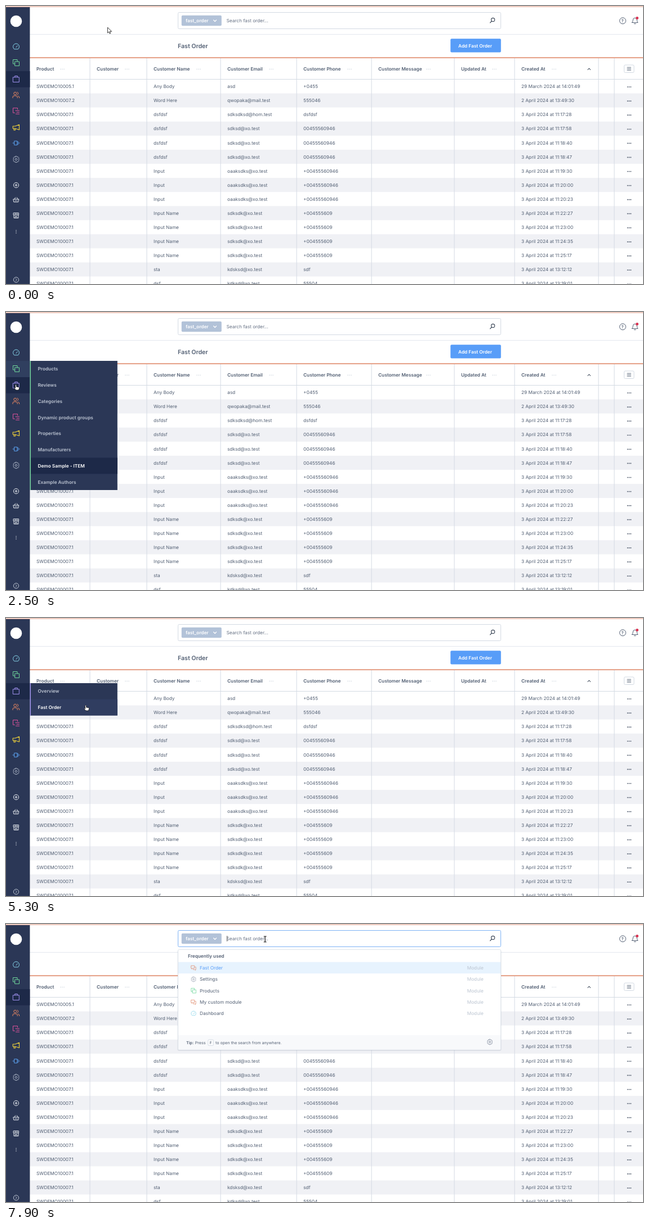
Animation of 1131 by 495 pixels, one loop 8000 ms. Source, as an HTML page:

```html
<!DOCTYPE html>
<html lang="en">
<head>
<meta charset="utf-8">
<title>Fast Order</title>
<style>
  html, body { margin: 0; width: 100%; height: 100%; overflow: hidden; background: #fff; }
  svg { display: block; width: 100%; height: 100%; }
  text { font-family: Inter, sans-serif; white-space: pre; text-rendering: geometricPrecision; }
</style>
</head>
<body>
<svg id="stage" viewBox="0 0 1131 495" xmlns="http://www.w3.org/2000/svg"></svg>
<script>
const stage = document.getElementById('stage');
const INK = '#525f73', RULE = '#d3dae3', ORANGE = '#e08a6c', BLUE = '#589df8';
const GREEN = '#6fd69b', PURPLE = '#a092f0', DARK = '#1d2948', NAVY = '#2b3756';

// y is the vertical middle of the capitals
const text = (x, y, s, fill = INK, weight = 400, size = 8.25) =>
  `<text x="${x}" y="${y + size * 0.364}" fill="${fill}" font-weight="${weight}" font-size="${size}">${s}</text>`;
const rect = (x, y, w, h, fill, extra = '') =>
  `<rect x="${x}" y="${y}" width="${w}" height="${h}" fill="${fill}" ${extra}/>`;
const path = (d, color, width = 1, fill = 'none') =>
  `<path d="${d}" stroke="${color}" stroke-width="${width}" fill="${fill}" stroke-linecap="round" stroke-linejoin="round"/>`;
const circle = (x, y, r, fill, extra = '') => `<circle cx="${x}" cy="${y}" r="${r}" fill="${fill}" ${extra}/>`;
const ring = (x, y, r, color, width = 1) => circle(x, y, r, 'none', `stroke="${color}" stroke-width="${width}"`);
const at = (x, y, body, scale = 1) => `<g transform="translate(${x} ${y}) scale(${scale})">${body}</g>`;
const dots = (x, y, gap, r, color) => [-gap, 0, gap].map(d => circle(x + d, y, r, color)).join('');

const icon = {
  gauge: c => path('M-3.8 4A5.5 5.5 0 1 1 3.8 4ZM0 1L2.3 -2', c),
  copies: c => path('M-2 -2H5.5V5.5H-2ZM-2 2H-5.5V-5.5H2V-2', c),
  bag: c => path('M-5.3 -3.2H5.3V5.5H-5.3ZM-2.3 -3.2V-5.5H2.3V-3.2', c),
  users: c => ring(-1.8, -2.8, 2.4, c) + path('M-6 5.2V3.6Q-6 1.4 -3.8 1.4H0Q2.2 1.4 2.2 3.6V5.2M2 -5.2A2.5 2.5 0 0 1 2 -.5M3.6 1.6Q5.8 1.8 5.8 5.2', c),
  tree: c => path('M2.5 -3V-5.3H-5.5V3.2H-2.5M-1 -.8H5.5M1 2.2H5.5M-.5 5.2H5.5', c),
  horn: c => path('M-5.8 -2H-2L5.5 -4.8V4.5L-2 2H-5.8ZM-4 2.2V5H-1.6V2.2', c, 1.1),
  plug: c => path('M-6 0H-3M3 0H6M-3 -3.5H2V3.5H-3ZM2 -2H4M2 2H4', c),
  gear: c => ring(0, 0, 1.8, c, .9) + path('M-1.2 -5.5H1.2L1.8 -4L3.4 -4.3L5 -2.4L4.2 -1L5.5 0L4.2 1.2L5 2.8L3.4 4.4L1.8 4L1.2 5.5H-1.2L-1.8 4L-3.4 4.4L-5 2.8L-4.2 1.2L-5.5 0L-4.2 -1L-5 -2.4L-3.4 -4.3L-1.8 -4Z', c, .9),
  plus: c => ring(0, 0, 4.6, c) + path('M-2.2 0H2.2M0 -2.2V2.2', c, 1.1),
  basket: c => path('M-4.8 -1H4.8L3.8 4H-3.8ZM-3 -1L-1.4 -4M3 -1L1.4 -4M-1.3 1V2.3M1.3 1V2.3', c),
  store: c => path('M-4.5 -4.5H4.5V-1H-4.5ZM-4 -1V4.5H4V-1M-1.5 -4.5V-1M1.5 -4.5V-1M-1.6 4.5V1.5H1.2V4.5', c),
  next: c => ring(0, 0, 4.6, c) + path('M-.8 -2L1.2 0L-.8 2', c),
  chat: c => path('M-5.2 -4.8H2V1H-2.5L-4.4 2.8V1H-5.2ZM3.6 -2H5.2V4H4.4V5.6L2.5 4H-1V2.8', c),
};

const COLUMNS = [
  ['Product', 54, 100], ['Customer', 161, 215], ['Customer Name', 262, 342], ['Customer Email', 393, 471],
  ['Customer Phone', 528, 610], ['Customer Message', 661, 750], ['Updated At', 808, 867], ['Created At', 915, 973],
];
const LINES = [149, 250, 381, 516, 649, 796, 903, 1052, 1080];
const LONG = '+00455560946', MID = '+004555609';
const ROWS = [
  ['5.1', 'Any Body', 'asd', '+0455', '29 March 2024 at 14:01:49'],
  ['7.2', 'Word Here', 'qwopaka@mail.test', '555046', '2 April 2024 at 13:49:30'],
  ['7.1', 'dsfdsf', 'sdksdksd@hom.test', 'dsfdsf', '11:17:28'],
  ['7.1', 'dsfdsf', 'sdksd@xo.test', LONG.slice(1), '11:17:58'],
  ['7.1', 'dsfdsf', 'sdksd@xo.test', LONG.slice(1), '11:18:40'],
  ['7.1', 'dsfdsf', 'sdksd@xo.test', LONG.slice(1), '11:18:47'],
  ['7.1', 'Input', 'oaaksdks@xo.test', LONG, '11:19:30'],
  ['7.1', 'Input', 'oaaksdks@xo.test', LONG, '11:20:00'],
  ['7.1', 'Input', 'oaaksdks@xo.test', LONG, '11:20:23'],
  ['7.1', 'Input Name', 'sdksdk@xo.test', MID, '11:22:27'],
  ['7.1', 'Input Name', 'sdksdk@xo.test', MID, '11:23:00'],
  ['7.1', 'Input Name', 'sdksdk@xo.test', MID, '11:24:35'],
  ['7.1', 'Input Name', 'sdksdk@xo.test', MID, '11:25:17'],
  ['7.1', 'sta', 'kdsksd@xo.test', 'sdf', '13:12:12'],
  ['7.1', 'dsf', 'kdksd@xo.test', '55504', '13:19:01'],
];

function table() {
  const top = 130.5, step = 25.08;
  let out = '';
  ROWS.forEach((row, i) => { if (i % 2) out += rect(42, top + i * step, 1089, step, '#f0f1f5'); });
  out += rect(42, 130, 1089, 1, RULE);
  out += LINES.map(x => rect(x - .5, 93, 1, 402, RULE)).join('');
  COLUMNS.forEach(([name, x, dotX]) => {
    out += text(x, 111.5, name, INK, 600) + dots(dotX, 112.3, 3, .65, '#b4bfcc');
  });
  out += path('M1033 113.5L1035.3 111L1037.6 113.5', '#3b4657', 1.1);
  out += rect(1097.5, 105, 17.5, 13.5, '#fff', `rx="2" stroke="${RULE}"`);
  out += path('M1103 109.3H1109.5M1103 111.8H1109.5M1103 114.3H1109.5', INK, .9);
  ROWS.forEach(([code, name, mail, phone, date], i) => {
    const y = 143.2 + i * step;
    const when = date.length < 9 ? '3 April 2024 at ' + date : date;
    out += text(54, y, 'SWDEMO1000' + code) + text(262, y, name) + text(393, y, mail)
      + text(528, y, phone) + text(915, y, when) + dots(1106.5, y + .9, 2.8, .95, '#4a5567');
  });
  return out;
}

function topBar() {
  return rect(42, 50, 1089, 1, '#e3e8ee')
    + rect(305.5, 11.5, 573, 29, '#fff', `id="field" rx="2" stroke="${RULE}"`)
    + rect(311.7, 16.8, 71, 18.4, '#b2c2d8', 'rx="2"') + text(319, 26, 'fast_order', '#fff', 600)
    + path('M368.5 25L371 27.5L373.5 25', '#fff', 1.2)
    + text(391.5, 26, 'Search fast order...', '#667184')
    + ring(864.6, 24.5, 3.1, '#3b4657', 1.1) + path('M862.3 27L859.6 29.8', '#3b4657', 1.2)
    + ring(1095, 26.3, 5.5, INK) + text(1092.6, 26.4, '?', INK, 600, 7.5)
    + path('M1111.5 29.5H1122Q1120.3 28 1120.3 25Q1120.3 21.2 1116.8 21.2Q1113.2 21.2 1113.2 25Q1113.2 28 1111.5 29.5ZM1115.3 31.6H1118.2', INK)
    + circle(1120.6, 21.5, 2.4, '#d9304f')
    + text(305, 71, 'Fast Order', INK, 600, 10.6)
    + rect(789.2, 58.3, 89.6, 24.2, BLUE, 'rx="2"') + text(803, 70.5, 'Add Fast Order', '#fff', 600)
    + rect(42, 91.3, 1089, 1.6, ORANGE) + rect(0, .6, 1131, 1.2, '#e6a995');
}

function sideBar() {
  const items = [
    ['gauge', 72.5, '#86d5ea'], ['copies', 101, GREEN], ['bag', 130, PURPLE], ['users', 158.5, '#f08a62'],
    ['tree', 187, '#e0529c'], ['horn', 216, '#f2d43a'], ['plug', 244, '#5aa0ee'], ['gear', 273, '#b3bccb'],
    ['plus', 319, '#e4e8ee'], ['basket', 345, '#e4e8ee'], ['store', 373, '#e4e8ee'], ['next', 487.5, '#c3cad6'],
  ];
  return rect(0, 2, 42.4, 493, NAVY)
    + rect(0, 87, 42.4, 29, '#303f5f', 'id="hover"') + rect(0, 116, 42.4, 28.7, DARK)
    + circle(18, 27, 10.3, '#fff')
    + items.map(([name, y, color]) => at(18, y, icon[name](color))).join('')
    + [-2.6, 0, 2.6].map(d => circle(18, 402 + d, .7, '#e4e8ee')).join('');
}

function flyout(id, top, accent, names, active) {
  const step = 28.75;
  return `<g id="${id}">` + rect(42.4, top, 155.4, names.length * step, NAVY)
    + rect(44, top + active * step, 153.8, step, DARK, `id="${id}Active"`)
    + rect(42.6, top, 1.4, names.length * step, accent)
    + names.map((s, i) => text(56.5, top + 14.4 + i * step, s, i === active ? '#fff' : '#bcc4d2', 600)).join('')
    + '</g>';
}

function results() {
  const items = [
    ['Fast Order', 'chat', ORANGE], ['Settings', 'gear', '#8893a5'], ['Products', 'copies', GREEN],
    ['My custom module', 'chat', ORANGE], ['Dashboard', 'gauge', '#86d5ea'],
  ];
  const small = 7.1;
  let out = '<g id="results">' + rect(304.5, 46, 575, 180, '#5b6b80', 'rx="3" opacity=".14"')
    + rect(305.5, 45.5, 573, 178.5, '#fff', 'rx="2" stroke="#dde3ea"')
    + rect(306, 67.7, 572, 20.4, '#e7f3fe') + rect(306, 198, 572, 25.5, '#f8f9fb')
    + text(323, 57.3, 'Frequently used', INK, 600);
  items.forEach(([name, kind, color], i) => {
    const y = 78 + i * 20.35;
    out += at(333, y, icon[kind](color), .78) + text(344, y, name, i ? INK : BLUE) + text(818.7, y, 'Module', '#bcc5d1');
  });
  return out + text(320, 211.2, 'Tip:', INK, 600, small) + text(335.7, 211.2, 'Press', INK, 400, small)
    + rect(358.8, 206, 9.4, 10.4, '#fff', `rx="1.5" stroke="${RULE}"`) + text(361.5, 211.2, 'F', INK, 400, small)
    + text(372, 211.2, 'to open the search from anywhere.', INK, 400, small)
    + at(859, 210, icon.gear('#6f7b8e'), .85) + '</g>';
}

const cursors = `<g id="pointer">
  <g id="arrow">${path('M.4 .4V10L2.6 7.9L4.1 11.3L5.7 10.6L4.3 7.3H7.2Z', '#222', .9, '#fff')}</g>
  <g id="hand">${path('M-1 1Q0 -.4 1 1V4L5 4.8Q6.2 5.1 6 6.4L5 10H.2L-2.9 6.6Q-2.7 5.4 -1 6.3Z', '#111', .8, '#fff')}</g>
  <g id="beam">${path('M-2 -5H2M-2 5H2M0 -5V5', '#fff', 2.6)}${path('M-2 -5H2M-2 5H2M0 -5V5', '#111', 1.2)}</g></g>`;

stage.innerHTML = rect(0, 0, 1131, 495, '#fff') + table() + topBar() + sideBar()
  + flyout('catalog', 87, GREEN, ['Products', 'Reviews', 'Categories', 'Dynamic product groups', 'Properties',
    'Manufacturers', 'Demo Sample - ITEM', 'Example Authors'], 6)
  + flyout('orders', 116, PURPLE, ['Overview', 'Fast Order'], 1)
  + results() + rect(392, 21, .8, 10, '#333', 'id="caret"') + cursors;

const el = {};
stage.querySelectorAll('[id]').forEach(node => { el[node.id] = node; });

// time, x, y of the pointer
const TRACK = [
  [100, 180, 38], [300, 172, 50], [500, 120, 90], [700, 42, 106], [1000, 19, 113.5], [1200, 19, 114],
  [1800, 19, 114], [2100, 17.5, 124], [2300, 17.5, 124], [2500, 17.5, 129], [3400, 17.5, 129],
  [3600, 24, 128], [3900, 78, 146], [4100, 98, 150], [4300, 97, 153], [4700, 120, 160], [5000, 146, 158],
  [5200, 140.5, 154.5], [5300, 141.5, 155], [5600, 141.5, 155], [5800, 178, 140], [6000, 300, 86],
  [6200, 455, 32], [6300, 486, 23], [6400, 460, 27],
];

function pointerAt(t) {
  const i = TRACK.findIndex(p => p[0] > t);
  if (i < 0) return TRACK[TRACK.length - 1].slice(1);
  if (i === 0) return TRACK[0].slice(1);
  const [t0, x0, y0] = TRACK[i - 1], [t1, x1, y1] = TRACK[i];
  const k = (t - t0) / (t1 - t0);
  return [x0 + (x1 - x0) * k, y0 + (y1 - y0) * k];
}

const clamp = v => Math.min(1, Math.max(0, v));
const show = (node, on) => node.setAttribute('opacity', +on);

function draw(time) {
  const t = Math.floor(time / 100) * 100;
  const [x, y] = pointerAt(t);
  const inCatalog = t >= 800 && t < 3100;
  const ordersShown = t < 3100 ? 0 : clamp((6100 - t) / 200);
  const overMenu = ordersShown > 0 && x < 198 && y > 116;
  const kind = x < 42.5 || overMenu ? 'hand' : x > 385 && y < 40 ? 'beam' : 'arrow';

  el.pointer.setAttribute('transform', `translate(${x} ${y})`);
  ['arrow', 'hand', 'beam'].forEach(name => show(el[name], name === kind));
  show(el.hover, inCatalog);
  show(el.catalog, inCatalog ? 1 - (1 - clamp((t - 800) / 300)) ** 2.5 : 0);
  show(el.orders, ordersShown);
  el.ordersActive.setAttribute('fill', overMenu && x > 43 && y > 144.7 ? '#303d60' : DARK);
  el.field.setAttribute('stroke', t >= 6700 ? '#7db2f5' : RULE);
  show(el.caret, t >= 6700 && (t < 7400 || t >= 7900));
  show(el.results, t >= 7100);
}

const start = performance.now();
function tick() {
  draw((performance.now() - start) % 8000);
  requestAnimationFrame(tick);
}
tick();
</script>
</body>
</html>
```
